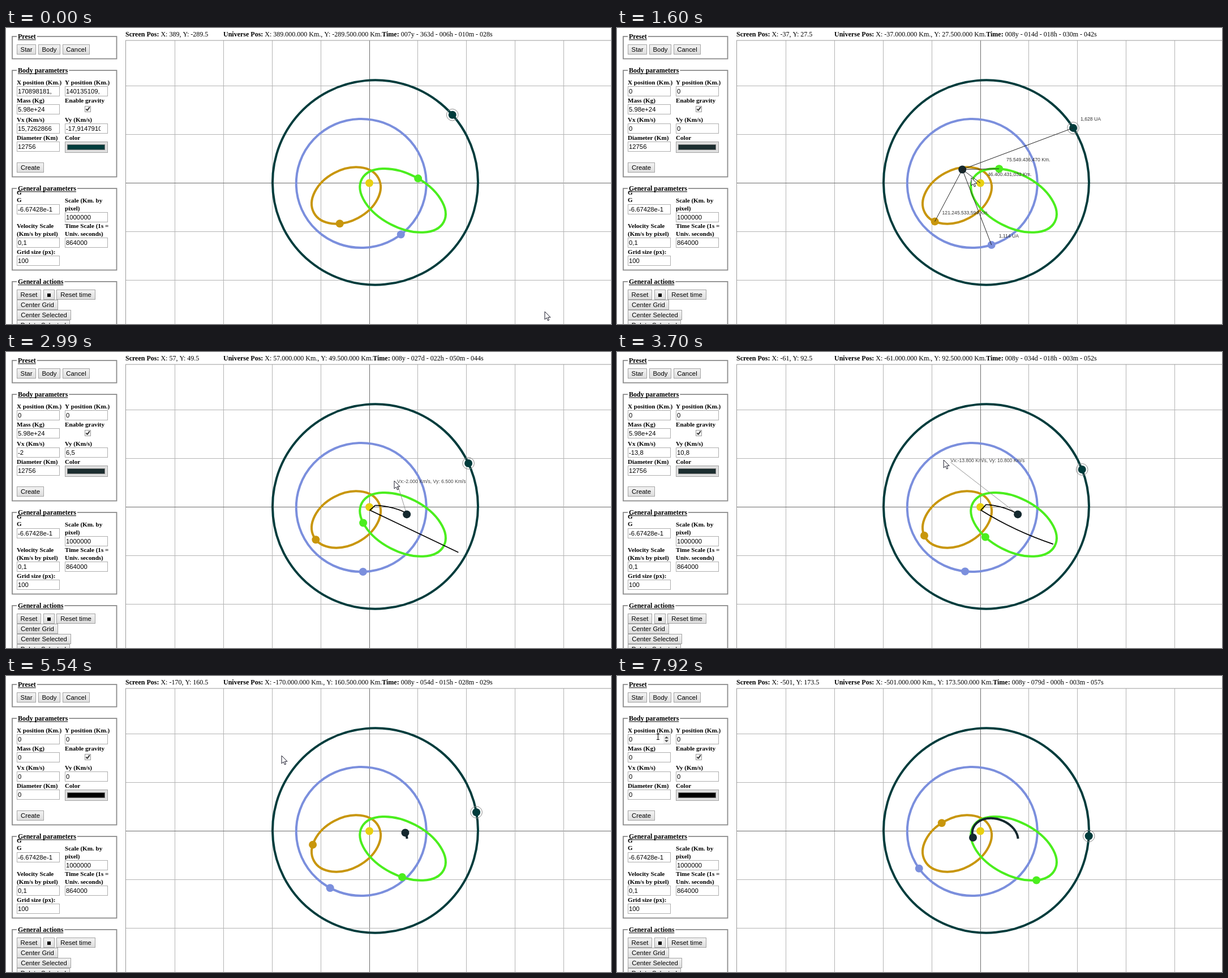
An HTML page with a canvas that plays this animation: 1069 px wide and 524 px high, repeating every 8 s.

```html
<!DOCTYPE html>
<html lang="en">
<head>
<meta charset="utf-8">
<title>Orbit simulator</title>
<style>
html, body { margin: 0; width: 100%; height: 100%; overflow: hidden; background: #fff; }
canvas { display: block; width: 1069px; height: 524px; }
</style>
</head>
<body>
<canvas id="stage" width="1069" height="524"></canvas>
<script>
const ctx = document.getElementById('stage').getContext('2d');
const SERIF = '"Liberation Serif", "Times New Roman", serif';
const SANS = '"Liberation Sans", Arial, sans-serif';
const LOOP = 8000, STEP = 1000 / 13, LAST_STEP = 103;
const SUN = { x: 642, y: 274.5 }, UNIT = 0.859, AU = 149.6, SUN_GM = 980;
const PRESET = 13, PLACE = 34, RELEASE = 65, FIELD_HOVER = 98;
const CANVAS_LEFT = 212, RAD = Math.PI / 180;
const NEW_COLOR = '#14282e';

// Universe units are millions of km, with y pointing up
const toStage = (x, y) => ({ x: SUN.x + x * UNIT, y: SUN.y - y * UNIT });
const START = toStage(77, -15);

// a: semi-major axis, e: eccentricity, w: periapsis angle, m: mean anomaly, n: degrees per day
const orbits = [
  { a: 181.5, e: 0.058, w: 174.5, dir: 1, m: 142.2, n: 0.581, color: '#003c3c', selected: true },
  { a: 115, e: 0.124, w: -2, dir: 1, m: 48.7, n: 1.167, color: '#7b8fdd' },
  { a: 64.75, e: 0.718, w: -28.2, dir: 1, m: 86, n: 2.71, color: '#c8960c' },
  { a: 81.7, e: 0.816, w: 207.6, dir: -1, m: 312.5, n: 1.925, color: '#4bee1e' }
];
const newOrbit = { a: 41.6, e: 0.671, w: 200.1, dir: -1, m: -55.7, n: 5.28 };
const RELEASE_M = 212;

// [step, days since the clock epoch]
const clock = [[0, 0], [21, 16.514051], [39, 29.69463], [56, 42.540556], [72, 56.387512], [88, 69.068819], [103, 80.745475]];
const EPOCH = ((7 * 365 + 363) * 24 + 6) * 3600 + 628;

// [step, x, y] where the pointer changes course
const pointerPath = [
  [-1, 976, 523], [0, 952, 502], [9, 30, 50], [13, 62, 42],
  [20, 610.2, 250.9], [21, 626, 265], [28, 708.1, 287.8], [34, 708.1, 287.8],
  [38, 691, 232], [39, 686, 228], [55, 492.5, 162.4], [56, 511, 135], [64, 689, 79.5],
  [71, 496, 136.6], [72, 487, 141], [78, 173, 122], [86, 25, 38], [90, 25, 38], [103, 72, 108]
];

function track(keys, k) {
  let i = 1;
  while (i < keys.length - 1 && keys[i][0] < k) i++;
  const p = keys[i - 1], q = keys[i];
  const f = (k - p[0]) / (q[0] - p[0]);
  return p.slice(1).map((v, j) => v + (q[j + 1] - v) * f);
}

function anomaly(o, degrees) {
  const m = degrees * RAD;
  let E = m + 0.85 * o.e * Math.sign(Math.sin(m));
  for (let i = 0; i < 8; i++) E -= (E - o.e * Math.sin(E) - m) / (1 - o.e * Math.cos(E));
  return E;
}

function pointAt(o, E) {
  const u = Math.cos(o.w * RAD), v = Math.sin(o.w * RAD);
  const p = o.a * (Math.cos(E) - o.e);
  const q = o.dir * o.a * Math.sqrt(1 - o.e * o.e) * Math.sin(E);
  return { x: SUN.x + p * u - q * v, y: SUN.y + p * v + q * u };
}

const bodyAt = (o, day) => pointAt(o, anomaly(o, o.m + o.n * day));

function text(str, x, y, font, color = '#000') {
  ctx.font = font;
  ctx.fillStyle = color;
  ctx.fillText(str, x, y);
  return x + ctx.measureText(str).width;
}

function stroke(color, width = 1) {
  ctx.strokeStyle = color;
  ctx.lineWidth = width;
  ctx.stroke();
}

function line(a, b, color, width) {
  ctx.beginPath();
  ctx.moveTo(a.x, a.y);
  ctx.lineTo(b.x, b.y);
  stroke(color, width);
}

function box(x, y, w, h, fill, border) {
  ctx.fillStyle = fill;
  ctx.fillRect(x, y, w, h);
  ctx.strokeStyle = border;
  ctx.lineWidth = 1;
  ctx.strokeRect(x + 0.5, y + 0.5, w - 1, h - 1);
}

function disc(p, color, r = 7) {
  ctx.beginPath();
  ctx.arc(p.x, p.y, r, 0, 2 * Math.PI);
  ctx.fillStyle = color;
  ctx.fill();
}

function fieldset(title, y, bottom) {
  ctx.strokeStyle = '#8c8c8c';
  ctx.lineWidth = 1.8;
  ctx.strokeRect(11, y, 184.5, bottom - y);
  ctx.font = `bold 12px ${SERIF}`;
  const w = ctx.measureText(title).width;
  ctx.fillStyle = '#fff';
  ctx.fillRect(19, y - 4, w + 4, 8);
  text(title, 21, y + 4, ctx.font);
  ctx.fillRect(21, y + 5.3, w, 1);
}

function button(label, x, y, w) {
  const g = ctx.createLinearGradient(0, y, 0, y + 18);
  g.addColorStop(0, '#f4f4f4');
  g.addColorStop(1, '#dcdcdc');
  box(x, y, w, 18, g, '#a3a3a3');
  ctx.textAlign = 'center';
  text(label, x + w / 2, y + 13, `11.4px ${SANS}`);
  ctx.textAlign = 'left';
}

// Label lines stacked above the place of their control at y
function label(str, x, y) {
  str.split('\n').reverse().forEach((row, i) => text(row, x, y - 3 - 14 * i, `bold 11.1px ${SERIF}`));
}

function field(name, value, x, y) {
  label(name, x, y);
  box(x, y, 76, 18, '#fff', '#aeaeae');
  ctx.save();
  ctx.beginPath();
  ctx.rect(x + 1, y, 62, 18);
  ctx.clip();
  text(value, x + 2, y + 13, `11.3px ${SANS}`);
  ctx.restore();
}

function formValues(k, velocity) {
  if (k < PRESET) {
    return { x: '170898181,', y: '140135109,', mass: '5.98e+24', vx: '15,7262866', vy: '-17,9147910', size: '12756', color: '#003c3c' };
  }
  const idle = { x: '0', y: '0', mass: '0', vx: '0', vy: '0', size: '0', color: '#000' };
  if (k >= RELEASE) return idle;
  const comma = v => String(v).replace('.', ',');
  return { ...idle, mass: '5.98e+24', size: '12756', color: '#1c2e30', vx: comma(velocity.x), vy: comma(velocity.y) };
}

function drawPanel(k, velocity) {
  const L = 19, R = 104, form = formValues(k, velocity);
  fieldset('Preset', 15, 54.5);
  button('Star', L, 29, 34);
  button('Body', 57, 29, 39);
  button('Cancel', 100, 29, 48);

  fieldset('Body parameters', 75, 263.5);
  field('X position (Km.)', form.x, L, 103);
  field('Y position (Km.)', form.y, R, 103);
  field('Mass (Kg)', form.mass, L, 135);
  label('Enable gravity', R, 135);
  box(139, 138, 11, 11, '#f6f6f6', '#9a9a9a');
  line({ x: 141.5, y: 143.5 }, { x: 143.8, y: 146 }, '#333', 2);
  line({ x: 143.5, y: 146.2 }, { x: 147.8, y: 140 }, '#333', 2);
  field('Vx (Km/s)', form.vx, L, 169);
  field('Vy (Km/s)', form.vy, R, 169);
  field('Diameter (Km)', form.size, L, 201);
  label('Color', R, 201);
  box(R, 201, 76, 20, '#dfdfdf', '#a3a3a3');
  box(108, 206, 67, 10, form.color, '#777');
  button('Create', L, 238, 48);

  fieldset('General parameters', 284, 428.5);
  field('G\n', '-6.67428e-1', L, 312 + 0);
  label('G', L, 311);
  field('Scale (Km. by\npixel)', '1000000', R, 326);
  field('Velocity Scale\n(Km/s by pixel)', '0,1', L, 371);
  field('Time Scale (1s =\nUniv. seconds)', '864000', R, 371);
  field('Grid size (px):', '100', L, 403);

  fieldset('General actions', 449, 560);
  button('Reset', L, 463, 43);
  button('', 66, 463, 20);
  ctx.fillStyle = '#000';
  ctx.fillRect(73, 470, 6, 6);
  button('Reset time', 89, 463, 69);
  button('Center Grid', L, 481, 73);
  button('Center Selected', L, 499, 96);
  button('Delete Selected', L, 517, 94);
}

const dotted = digits => digits.replace(/\B(?=(\d{3})+$)/g, '.');

function drawStatus(universe, day) {
  const bold = `bold 12px ${SERIF}`, plain = `12px ${SERIF}`, y = 14.5;
  const km = v => dotted(String(v * 1e6));
  let x = text('Screen Pos:', 211, y, bold);
  text(` X: ${universe.x}, Y: ${universe.y}`, x, y, plain);
  x = text('Universe Pos:', 384, y, bold);
  x = text(` X: ${km(universe.x)} Km., Y: ${km(universe.y)} Km.`, x, y, plain);
  x = text('Time:', x, y, bold);
  const s = Math.round(EPOCH + day * 86400), d = Math.floor(s / 86400);
  const parts = [[Math.floor(d / 365), 'y'], [d % 365, 'd'], [Math.floor(s / 3600) % 24, 'h'], [Math.floor(s / 60) % 60, 'm'], [s % 60, 's']];
  text(' ' + parts.map(([v, u]) => String(v).padStart(3, '0') + u).join(' - '), x, y, plain);
}

function drawGrid() {
  for (let i = -4; i <= 4; i++) {
    const x = Math.floor(SUN.x + i * 100 * UNIT) + 0.5;
    const y = Math.floor(SUN.y + i * 100 * UNIT) + 0.5;
    const color = i ? '#b4b4b4' : '#6c6c6c';
    line({ x, y: 22 }, { x, y: 524 }, color);
    if (y > 22) line({ x: CANVAS_LEFT, y }, { x: 1069, y }, color);
  }
  ctx.strokeStyle = '#9a9a9a';
  ctx.strokeRect(211.5, 22, 900, 600);
}

function drawTrail(o) {
  const c = { x: SUN.x - o.a * o.e * Math.cos(o.w * RAD), y: SUN.y - o.a * o.e * Math.sin(o.w * RAD) };
  ctx.beginPath();
  ctx.ellipse(c.x, c.y, o.a, o.a * Math.sqrt(1 - o.e * o.e), o.w * RAD, 0, 2 * Math.PI);
  stroke(o.color, 4);
}

function drawNewBody(day) {
  const from = anomaly(newOrbit, RELEASE_M);
  const to = Math.max(from, anomaly(newOrbit, newOrbit.m + newOrbit.n * day));
  ctx.beginPath();
  for (let i = 0; i <= 60; i++) {
    const p = pointAt(newOrbit, from + (to - from) * i / 60);
    ctx.lineTo(p.x, p.y);
  }
  stroke(NEW_COLOR, 4);
  disc(pointAt(newOrbit, to), NEW_COLOR);
}

function drawDistances(p, targets) {
  for (const t of targets) {
    const d = Math.hypot(t.x - p.x, t.y - p.y) / UNIT;
    const [whole, part] = (d < AU ? d * 1e6 : d / AU).toFixed(3).split('.');
    line(p, t, '#222');
    text(`${dotted(whole)},${part} ${d < AU ? 'Km.' : 'UA'}`, t.x + 13, t.y - 13, `8.6px ${SANS}`, '#333');
  }
}

// Free fall around the sun; a pass that is too close flings the body out again
function drawForecast(velocity) {
  const dt = 0.05, days = 55, perDay = 0.0864;
  let x = 77, y = -15, vx = velocity.x * perDay, vy = velocity.y * perDay, r = Math.hypot(x, y);
  ctx.beginPath();
  for (let t = 0; t < days && r > 12; t += dt) {
    const p = toStage(x, y);
    ctx.lineTo(p.x, p.y);
    vx -= SUN_GM * x / r ** 3 * dt;
    vy -= SUN_GM * y / r ** 3 * dt;
    x += vx * dt;
    y += vy * dt;
    r = Math.hypot(x, y);
  }
  if (r <= 12) {
    const speed = Math.hypot(velocity.x, velocity.y);
    const reach = 197 - 3 * speed, angle = 27 * RAD;
    const end = { x: SUN.x + reach * Math.cos(angle), y: SUN.y + reach * Math.sin(angle) };
    const sag = Math.max(0, speed - 7) * 0.7;
    ctx.lineTo(643, 280);
    ctx.quadraticCurveTo((643 + end.x) / 2 - sag / 2, (280 + end.y) / 2 + sag, end.x, end.y);
  }
  stroke('#000', 1.7);
}

function drawPointer(k) {
  const [x, y] = track(pointerPath, k);
  if (k >= FIELD_HOVER) {
    line({ x: x + 0.5, y: y - 5 }, { x: x + 0.5, y: y + 4 }, '#000');
    for (const dy of [-5.5, 4.5]) line({ x: x - 2, y: y + dy }, { x: x + 3, y: y + dy }, '#000');
    ctx.fillStyle = '#eee';
    ctx.fillRect(82, 104, 11, 16);
    ctx.fillStyle = '#444';
    for (const s of [-1, 1]) {
      ctx.beginPath();
      ctx.moveTo(84, 112 + s * 1.5);
      ctx.lineTo(91, 112 + s * 1.5);
      ctx.lineTo(87.5, 112 + s * 5);
      ctx.fill();
    }
    return;
  }
  ctx.beginPath();
  for (const [dx, dy] of [[0, 0], [0, 14], [3.2, 11], [5.5, 16], [7.6, 15], [5.4, 10.2], [10, 10.2]]) ctx.lineTo(x + dx, y + dy);
  ctx.closePath();
  ctx.fillStyle = '#fff';
  ctx.fill();
  stroke('#1a1a2a');
}

function draw(k) {
  ctx.fillStyle = '#fff';
  ctx.fillRect(0, 0, 1069, 524);
  const [day] = track(clock, k);

  // The page reacts to the pointer one step late
  const [mx, my] = track(pointerPath, k - 1);
  const inside = mx >= CANVAS_LEFT;
  const mouse = inside ? { x: mx, y: my } : { x: CANVAS_LEFT, y: 125.5 };
  const universe = {
    x: Math.round((mouse.x - SUN.x) / UNIT),
    y: Math.floor((SUN.y - mouse.y) / UNIT) + 0.5
  };
  const placing = k >= PRESET && k < PLACE && inside;
  const aiming = k >= PLACE && k < RELEASE;
  const velocity = aiming ? { x: (universe.x - 77) * 0.1, y: (universe.y + 15.5) * 0.1 } : { x: 0, y: 0 };

  drawPanel(k, velocity);
  drawStatus(universe, day);
  drawGrid();

  const bodies = orbits.map(o => bodyAt(o, day));
  orbits.forEach(drawTrail);
  disc(SUN, '#e8d010');
  orbits.forEach((o, i) => {
    disc(bodies[i], o.color);
    if (!o.selected) return;
    ctx.beginPath();
    ctx.arc(bodies[i].x, bodies[i].y, 10.3, 0, 2 * Math.PI);
    stroke('#8a8a8a');
  });

  if (placing) {
    const spot = toStage(universe.x, universe.y + 0.5);
    disc(spot, NEW_COLOR);
    drawDistances(spot, [SUN, ...bodies]);
  }
  if (aiming) {
    drawForecast(velocity);
    line(START, mouse, '#888', 0.9);
    disc(START, NEW_COLOR);
    text(`Vx:${velocity.x.toFixed(3)} Km/s, Vy: ${velocity.y.toFixed(3)} Km/s`, mouse.x, mouse.y, `8.6px ${SANS}`, '#444');
  }
  if (k >= RELEASE) drawNewBody(day);
  drawPointer(k);
}

function tick(now) {
  const t = now % LOOP;
  draw(Math.min(LAST_STEP, Math.floor((t + 17) / STEP)));
  requestAnimationFrame(tick);
}
draw(0);
requestAnimationFrame(tick);
</script>
</body>
</html>
```
